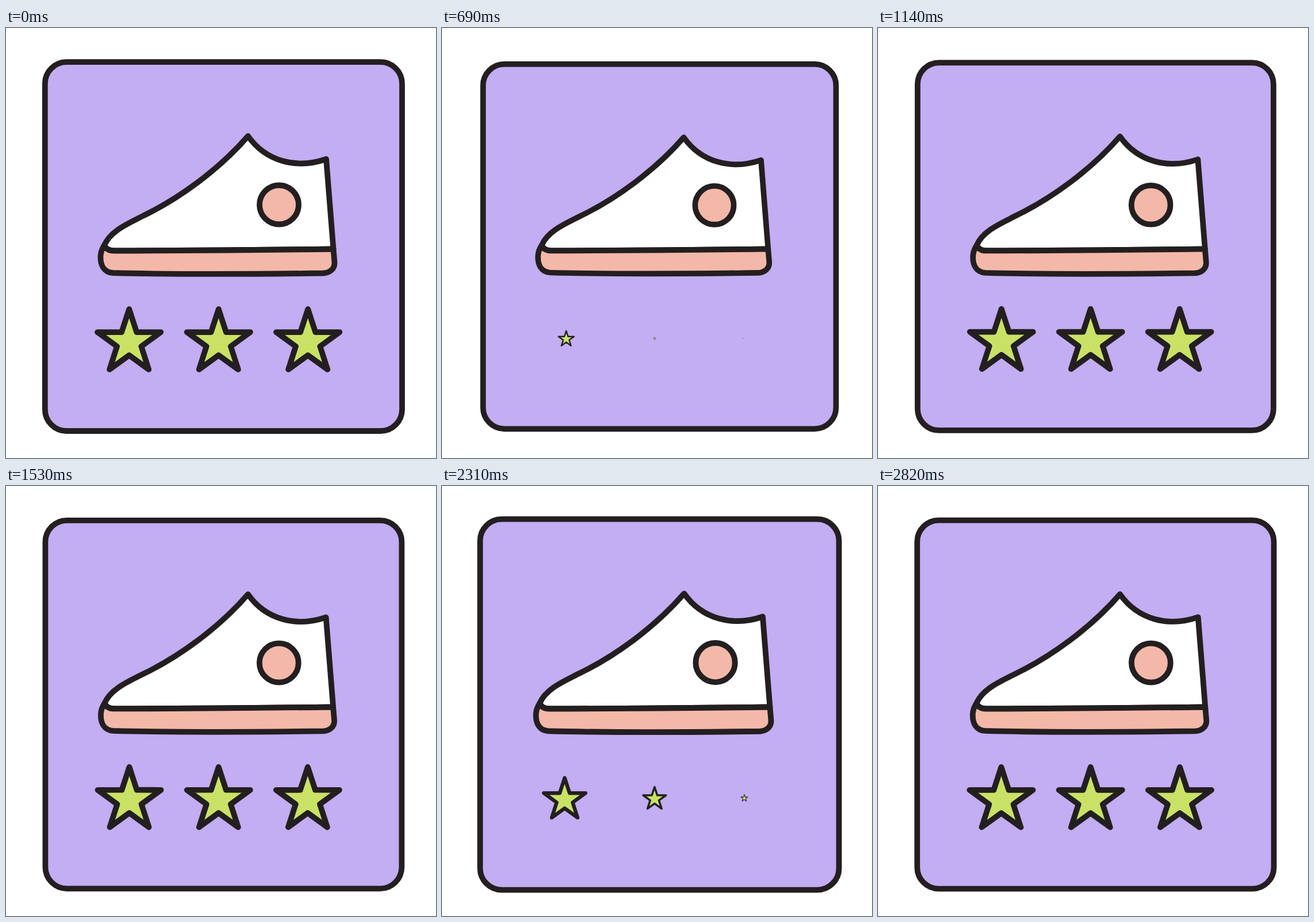
Write an HTML page that moves like this. It is 748x748 px and loops after 2.85 s.

```html
<!DOCTYPE html>
<html lang="en">
<head>
<meta charset="utf-8">
<title>Shoe rating</title>
<style>
  html, body { margin: 0; height: 100%; overflow: hidden; background: #fff; }
  svg { display: block; width: 100vw; height: 100vh; }
  #card { stroke: #231f20; stroke-width: 9.8; stroke-linejoin: round; stroke-linecap: round; }
</style>
</head>
<body>
<svg viewBox="0 0 748 748">
  <g id="card">
    <rect x="67.8" y="59.2" width="621.2" height="641.8" rx="37.5" fill="#c3adf3"/>
    <path fill="#fff" d="M421 188C452 232 505 246 557 228L569.5 384.5Q380 387 188 387.5C180 387.5 174 385 171 378
      C182 352 215 339 240 326C300 297 370 247 421 188Z"/>
    <path fill="#f4b8a8" d="M171 378C174 385 180 387.5 188 387.5Q380 387 569.5 384.5L571.5 408C572 420 562 426 552 426.5
      C440 428 300 429 186 426C170 425 164 412 164.5 397Q165 387 171 378Z"/>
    <circle cx="475" cy="307.5" r="34" fill="#f4b8a8"/>
  </g>
</svg>
<script>
  const LOOP = 2850;
  const CENTER = [378.4, 380];
  const STAR_Y = 541.7;
  const SHRINK = 372, STAGGER = 74.5, STAR_STARTS = [198, 1714];

  const card = document.getElementById('card');
  const smooth = p => {
    p = Math.min(1, Math.max(0, p));
    return p * p * (3 - 2 * p);
  };

  const starPoints = Array.from({ length: 10 }, (_, i) => {
    const radius = i % 2 ? 22.2 : 58, angle = i * Math.PI / 5;
    return [radius * Math.sin(angle), 5.3 - radius * Math.cos(angle)].map(v => v.toFixed(2));
  }).join(' ');

  const stars = [214.2, 369.8, 525.2].map(x => {
    const el = document.createElementNS('http://www.w3.org/2000/svg', 'polygon');
    el.setAttribute('points', starPoints);
    el.setAttribute('fill', '#c9e265');
    card.append(el);
    return { el, x };
  });

  // Damped oscillation with a soft start
  function spring(t, start, amplitude) {
    const u = t - start;
    if (u <= 0) return 0;
    return amplitude * smooth(u / 130) * Math.sin(2 * Math.PI * u / 455) * Math.exp(-0.00305 * u);
  }

  // Shrinks to nothing, then grows straight back
  function starScale(t, index) {
    return STAR_STARTS.reduce((scale, start) => {
      const p = (t - start - index * STAGGER) / SHRINK;
      return scale * (1 - smooth(p) + smooth(p - 1));
    }, 1);
  }

  function draw(now) {
    const t = now % LOOP;
    const zoom = 1 + spring(t, 268, 0.098) + spring(t, 1881, -0.054);
    const [cx, cy] = CENTER;
    card.setAttribute('transform', `translate(${cx} ${cy}) scale(${zoom}) translate(${-cx} ${-cy})`);
    stars.forEach(({ el, x }, i) => {
      el.setAttribute('transform', `translate(${x} ${STAR_Y}) scale(${starScale(t, i)})`);
    });
  }

  const origin = performance.now();
  (function tick() {
    draw(performance.now() - origin);
    requestAnimationFrame(tick);
  })();
</script>
</body>
</html>
```
